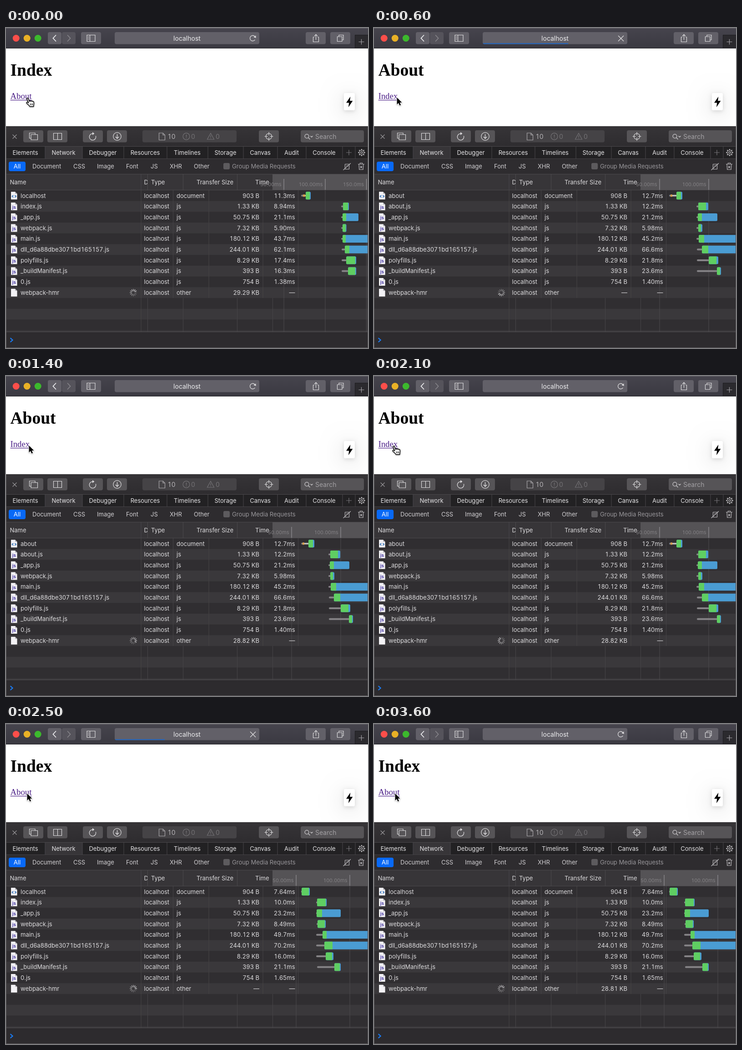
These frames come from a looping animation (796x704 px, 3700 ms). An HTML page with a canvas:

```html
<!DOCTYPE html>
<html lang="en">
<head>
<meta charset="utf-8">
<title>Network panel</title>
<style>
html, body { margin: 0; width: 100%; height: 100%; overflow: hidden; background: #2d2b2d; }
canvas { display: block; width: 796px; height: 704px; }
</style>
</head>
<body>
<canvas id="stage" width="796" height="704"></canvas>
<script>
const ctx = document.getElementById('stage').getContext('2d');
const SANS = 'Inter, Roboto, sans-serif';
const SERIF = '"Liberation Serif", "Noto Serif", serif';
const STEP = 100, STEPS = 37;
const ROW_TOP = 357, ROW_H = 23.7, TABLE_END = 668;
const GREEN = '#5fce62', BLUE = '#4a9cd3', INK = '#dddcde', BUTTON = '#626068';

const LIBS = ['_app.js', 'webpack.js', 'main.js', 'dll_d6a88dbe3071bd165157.js',
  'polyfills.js', '_buildManifest.js', '0.js', 'webpack-hmr'];
const LIB_SIZES = ['50.75 KB', '7.32 KB', '180.12 KB', '244.01 KB', '8.29 KB', '393 B', '754 B'];

// bars: [queue start, green start, blue start, end]
const indexFirst = {
  names: ['localhost', 'index.js'], size: '903 B', hmr: '29.29 KB',
  times: ['11.3ms', '8.94ms', '21.1ms', '5.90ms', '43.7ms', '62.1ms', '17.4ms', '16.3ms', '1.38ms'],
  ticks: [[611, '50.00ms'], [702, '100.00ms'], [792.5, '150.0ms']],
  connect: [653, 658],
  bars: [[649, 659, 668, 670], [737, 741, 752, 754], [737, 740, 748, 775], [737, 740, 747, 748.5],
    [737, 740, 747, 800], [738, 745, 755, 800], [738, 748, 768, 770], [738, 752, 768, 770]]
};
const aboutPage = {
  names: ['about', 'about.js'], size: '908 B', hmr: '28.82 KB',
  times: ['12.7ms', '12.2ms', '21.2ms', '5.98ms', '45.2ms', '66.6ms', '21.8ms', '23.6ms', '1.40ms'],
  ticks: [[628, '50.00ms'], [736, '100.00ms']],
  connect: [652, 656],
  bars: [[649, 665, 675, 678], [709, 713, 730, 735], [709, 712, 721, 755], [709, 713, 719, 722],
    [709, 714, 726, 800], [710, 721, 735, 800], [710, 736, 753, 757], [710, 754, 761, 763]]
};
const indexAgain = {
  names: ['localhost', 'index.js'], size: '904 B', hmr: '28.81 KB',
  times: ['7.64ms', '10.0ms', '23.2ms', '8.49ms', '49.7ms', '70.2ms', '16.0ms', '21.1ms', '1.65ms'],
  ticks: [[638, '50.00ms'], [756, '100.00ms']],
  bars: [[649, 650, 666, 668], [682, 684, 703, 705], [682, 683, 695, 736], [683, 685, 701, 703],
    [682, 696, 705, 800], [682, 700, 718, 800], [682, 703, 717, 720], [684, 722, 734, 736]]
};
const indexClosed = { ...indexFirst, ticks: [[620, '20.00s'], [720, '40.00s']], tiny: true };
const aboutClosed = { ...aboutPage, ticks: [[653, '1000.0ms'], [785.5, '2.00s']], tiny: true, short: true };

function rect(x, y, w, h, fill) {
  ctx.fillStyle = fill;
  ctx.fillRect(x, y, w, h);
}
function box(x, y, w, h, r, fill) {
  ctx.beginPath();
  ctx.roundRect(x, y, w, h, r);
  ctx.fillStyle = fill;
  ctx.fill();
}
function line(d, color = INK, width = 1.2) {
  ctx.strokeStyle = color;
  ctx.lineWidth = width;
  ctx.stroke(new Path2D(d));
}
function shape(d, fill) {
  ctx.fillStyle = fill;
  ctx.fill(new Path2D(d));
}
function ring(x, y, r, color = INK, width = 1.2, from = 0, to = Math.PI * 2) {
  ctx.beginPath();
  ctx.arc(x, y, r, from, to);
  ctx.strokeStyle = color;
  ctx.lineWidth = width;
  ctx.stroke();
}
// Every digit takes the same width, as in a table of figures.
function text(s, x, y, color = INK, align = 'left', font = '13px ' + SANS) {
  ctx.font = font;
  ctx.textAlign = 'left';
  ctx.fillStyle = color;
  const cell = ctx.measureText('0').width;
  const runs = s.match(/\d|\D+/g).map(run => {
    const own = ctx.measureText(run).width;
    return { run, own, width: /\d/.test(run) ? cell : own };
  });
  const total = runs.reduce((sum, r) => sum + r.width, 0);
  let pen = x - (align === 'right' ? total : align === 'center' ? total / 2 : 0);
  for (const { run, own, width } of runs) {
    ctx.fillText(run, pen + (width - own) / 2, y);
    pen += width;
  }
}
function fade(y, h, top, bottom) {
  const g = ctx.createLinearGradient(0, y, 0, y + h);
  g.addColorStop(0, top);
  g.addColorStop(1, bottom);
  return g;
}
function reload(x, y, r, turn = 0) {
  ctx.save();
  ctx.translate(x, y);
  ctx.rotate(turn);
  ring(0, 0, r, INK, 1.3, -0.3, Math.PI * 1.5);
  shape(`M-.5 ${-r - 3.2}l4.5 3.2l-4.5 3.2z`, INK);
  ctx.restore();
}

function drawBrowser(s) {
  rect(0, 0, 796, 45, fade(0, 45, '#46444d', '#3a3941'));
  rect(0, 0, 796, 1, '#68666c');
  rect(0, 44, 796, 1, '#1f1e22');
  ['#fc4e4a', '#e9b126', '#3cb92d'].forEach((c, i) => box(14.7 + i * 24, 15, 15, 15, 7.5, c));

  box(92, 9, 30, 26.5, 4, BUTTON);
  box(123, 9, 30, 26.5, 4, '#55535b');
  line('M110 15.5L103.5 22.5L110 29.5', '#ececee', 1.8);
  line('M135 15.5L141.5 22.5L135 29.5', '#88868b', 1.6);
  box(165, 9, 44, 26.5, 4, BUTTON);
  line('M178 15.5H196V29.5H178ZM184.5 15.5V29.5M180 19H182.5M180 22H182.5M180 25H182.5', INK);

  box(239, 9, 318, 26.5, 4, BUTTON);
  if (s.progress) {
    ctx.save();
    ctx.beginPath();
    ctx.roundRect(239, 9, 318, 26.5, 4);
    ctx.clip();
    rect(239, 33.5, s.progress, 2, '#1a68cc');
    ctx.restore();
    line('M537 17L549 29M549 17L537 29', INK, 1.4);
  } else reload(542.5, 22.5, 6, 0.9);
  text('localhost', 398, 27.5, '#ececee', 'center', '14px ' + SANS);

  const dim = s.list.tiny;
  box(659, 9, 44, 26.5, 4, dim ? '#53515a' : BUTTON);
  line('M678 20H675.5V30.5H687.5V20H685M681.5 26V14.5M678 18L681.5 14.2L685 18', dim ? '#88868b' : INK);
  box(713, 9, 44, 26.5, 4, BUTTON);
  line('M732 19V15.5H742V26H739M728.5 19H739V29.5H728.5Z', INK);
  rect(767, 15, 29, 29, '#2b2a2e');
  rect(767, 15, 29, 1, '#1d1c1f');
  rect(767, 15, 1, 29, '#1d1c1f');
  line('M781.5 24.5V36.5M775.5 30.5H787.5', '#a5a3a8');
}

function drawPage(s) {
  rect(0, 45, 796, 171, '#fff');
  const [title, link] = s.about ? ['About', 'Index'] : ['Index', 'About'];
  text(title, 9.5, 105, '#000', 'left', 'bold 37.5px ' + SERIF);
  const color = s.red ? '#dc1a12' : '#4b1f87';
  text(link, 9.5, 156.3, color, 'left', '18.75px ' + SERIF);
  rect(9.5, 158, ctx.measureText(link).width, 1.2, color);

  ctx.save();
  ctx.beginPath();
  ctx.rect(0, 45, 796, 171);
  ctx.clip();
  ctx.shadowColor = 'rgba(0,0,0,.16)';
  ctx.shadowBlur = 48;
  ctx.shadowOffsetY = 8;
  box(743, 143, 24, 38, 3, '#fff');
  ctx.shadowColor = 'rgba(0,0,0,.14)';
  ctx.shadowBlur = 9;
  ctx.shadowOffsetY = 2;
  box(743, 143, 24, 38, 3, '#fff');
  ctx.restore();
  shape('M757.3 151L748 164.5H754.2L753 174.3L762.4 160.2H756.2Z', '#000');
}

function drawTools(s) {
  rect(0, 216, 796, 45, fade(216, 45, '#363437', '#2e2c2f'));
  line('M14.5 234.5L23.5 243.5M23.5 234.5L14.5 243.5', '#99979a');
  for (const x of [38, 91, 169, 222, 556]) box(x, 225, 44, 26.5, 4, '#565457');
  line('M55 242.5H51.5V231H64V234M55 234.5H69.5V246H55Z');
  line('M104.5 231.5H122.5V245.5H104.5ZM113.5 231.5V245.5', INK);
  reload(190.5, 239.5, 7.2);
  ring(244.5, 238.5, 8.7);
  line('M244.5 233.5V243M240.7 239.3L244.5 243.2L248.3 239.3', INK, 1.4);
  ring(578, 238.5, 6.5);
  line('M578 229V236M578 241V248M568.5 238.5H575.5M580.5 238.5H587.5');

  box(300, 225, 207, 26.5, 4, '#454346');
  line('M336.5 231H345L349.5 235.5V246.5H336.5ZM345 231V235.5H349.5', '#a9a7aa');
  const font = '14px ' + SANS;
  text(s.list.short ? '2' : '10', 355, 243.5, '#b5b3b6', 'left', font);
  ring(396.5, 238.5, 7.4, '#737174');
  line('M396.5 234.5V239.8M396.5 241.3V242.8', '#737174', 1.4);
  text('0', 407, 243.5, '#737174', 'left', font);
  line('M450 231.5L457.5 245H442.5ZM450 236V241M450 242.2V243.6', '#737174');
  text('0', 461, 243.5, '#737174', 'left', font);

  box(648, 225, 139, 26.5, 4, '#565457');
  ring(661.5, 238, 4.4, '#cfcdd0', 1.3);
  line('M664.7 241.3L668.5 245M669.5 237.5L672 240L674.5 237.5', '#cfcdd0', 1.3);
  text('Search', 680, 243.5, '#a3a1a4', 'left', font);
}

function drawTabs() {
  rect(0, 260, 796, 28, '#222123');
  rect(0, 260, 796, 1, '#4b494c');
  rect(86, 261, 82, 27, '#373538');
  rect(0, 287, 796, 1, '#434144');
  const edges = [0, 86, 168, 259, 354, 444, 522, 597, 660, 740];
  ['Elements', 'Network', 'Debugger', 'Resources', 'Timelines', 'Storage', 'Canvas', 'Audit', 'Console']
    .forEach((name, i) => text(name, (edges[i] + edges[i + 1]) / 2 - 0.5, 279, '#e6e5e7', 'center'));
  for (const x of [...edges.slice(1), 768]) rect(x - 0.5, 261, 1, 27, '#4b494c');
  line('M754 268V280M748 274H760', '#77757a');
  ring(782, 274, 5.4, '#bbb9bc');
  ring(782, 274, 2.2, '#bbb9bc');
  for (let i = 0; i < 8; i++) {
    const c = Math.cos(i * Math.PI / 4), n = Math.sin(i * Math.PI / 4);
    line(`M${782 + c * 5.5} ${274 + n * 5.5}L${782 + c * 7.8} ${274 + n * 7.8}`, '#bbb9bc', 2);
  }

  rect(0, 288, 796, 34, '#2e2c2f');
  box(6, 294, 37, 21, 4, '#0869f7');
  text('All', 24.5, 309, '#fff', 'center');
  [['Document', 58], ['CSS', 148], ['Image', 200], ['Font', 264], ['JS', 318], ['XHR', 360], ['Other', 413]]
    .forEach(([name, x]) => text(name, x, 309, '#d2d0d3'));
  box(478, 297, 14, 14, 3, '#5d5b5e');
  text('Group Media Requests', 497, 309, '#98969a');
  line('M745.5 299.5H756.5M745.5 299.5V310.5H754.5V299.5M741.5 312.5L758 297.5M748 303H752', '#bbb9bc');
  line('M774 299.5H788M778.5 299V297H783.5V299M776 300L776.8 311.5H785.2L786 300M778.7 303.5L783.3 308.5M783.3 303.5L778.7 308.5', '#bbb9bc');
}

function drawHeader(list) {
  rect(0, 321, 796, 36, '#373538');
  rect(586, 322, 210, 34, '#555356');
  rect(0, 321, 796, 1, '#4b494c');
  rect(0, 356, 796, 1, '#4b494c');
  for (const x of [296.5, 311, 389, 508]) rect(x, 322, 1, 34, '#4b494c');
  text('Name', 8.5, 344);
  ctx.save();
  ctx.beginPath();
  ctx.rect(297, 322, 14, 34);
  ctx.clip();
  text('Domain', 303.5, 344);
  ctx.restore();
  text('Type', 319, 344);
  text('Transfer Size', 500, 344, INK, 'right');
  text('Time', 578.5, 344, INK, 'right');
  for (const [x, label] of list.ticks) {
    text(label, x - 5.5, 347.5, '#838184', 'right', '11px ' + SANS);
    rect(x - 0.5, 332, 1, 24, '#a09ea1');
  }
}

function drawIcon(y, kind) {
  shape(`M11 ${y - 8.5}H20L24.5 ${y - 4}V${y + 8.5}H11Z`, '#f3f2f5');
  shape(`M20 ${y - 8.5}V${y - 4}H24.5Z`, '#b4b2b8');
  if (kind === 'js') text('js', 17.8, y + 5, '#4334a0', 'center', 'bold 9.5px ' + SANS);
  if (kind === 'doc') line(`M16.3 ${y - 1}L13.3 ${y + 1.5}L16.3 ${y + 4}M19.2 ${y - 1}L22.2 ${y + 1.5}L19.2 ${y + 4}`, '#2468b4', 1.4);
}

function drawSpinner(x, y, phase) {
  ctx.lineCap = 'round';
  for (let i = 0; i < 12; i++) {
    const a = i * Math.PI / 6, c = Math.cos(a), n = Math.sin(a);
    const glow = 0.2 + 0.65 * ((i - phase + 24) % 12) / 11;
    line(`M${x + c * 4} ${y + n * 4}L${x + c * 7.5} ${y + n * 7.5}`, `rgba(225,224,226,${glow})`, 1.5);
  }
  ctx.lineCap = 'butt';
}

function drawBar(list, i, y) {
  const bar = list.bars[i];
  if (list.tiny) {
    const x = list.short && i ? 654.5 : i === 8 ? 652 : 651.3;
    box(x - 2.3, y - 2, 3, 4, 2, '#858386');
    rect(x, y - 8.5, 2.4, 17, BLUE);
    return;
  }
  if (!bar) return;
  const [queue, green, blue, end] = bar;
  box(queue, y - 2, green - queue + 1, 4, 2, '#858386');
  if (i === 0 && list.connect) {
    const [a, b] = list.connect;
    rect(b, y - 1, green - b, 2, '#d5d3cd');
    box(a, y - 2.5, b - a, 5, 1, '#d9a14d');
  }
  box(green, y - 8.5, end - green, 17, 2.5, BLUE);
  box(green, y - 8.5, blue - green, 17, [2.5, 0, 0, 2.5], GREEN);
}

function drawTable(s) {
  const list = s.list, count = list.short ? 2 : 10;
  ctx.save();
  ctx.beginPath();
  ctx.rect(0, ROW_TOP, 796, TABLE_END - ROW_TOP);
  ctx.clip();
  for (let i = 0; i < 14; i++) rect(0, ROW_TOP + i * ROW_H, 796, ROW_H + 1, i % 2 ? '#3a383b' : '#302e31');
  const split = ROW_TOP + count * ROW_H;
  for (const x of [296.5, 367, 445.5, 564.5, 642]) rect(x, ROW_TOP, 1, split - ROW_TOP, '#464447');
  for (const x of [296.5, 311, 389, 508, 586]) rect(x, split, 1, TABLE_END - split, '#464447');
  for (const [x] of list.ticks) rect(x - 0.5, ROW_TOP, 1, TABLE_END - ROW_TOP, '#4d4b4e');

  const names = [...list.names, ...LIBS], sizes = [list.size, '1.33 KB', ...LIB_SIZES];
  for (let i = 0; i < count; i++) {
    const y = ROW_TOP + (i + 0.5) * ROW_H, base = y + 4.7, hmr = i === 9;
    const color = hmr && list.tiny ? '#d2453e' : INK;
    drawIcon(y, hmr ? '' : i ? 'js' : 'doc');
    text(names[i], 32, base, color);
    text('localhost', 303.5, base, color);
    text(hmr ? 'other' : i ? 'js' : 'document', 375, base, color);
    text(hmr ? (s.pending ? '—' : list.hmr) : sizes[i], 557, base, color, 'right');
    text(hmr ? (list.tiny ? '52.50s' : '—') : list.times[i], 635.5, base, color, 'right');
    if (!hmr) drawBar(list, i, y);
    else if (list.tiny) box(649, y - 8.5, 160, 17, 2, BLUE);
    else drawSpinner(280, y, s.spin);
  }
  ctx.restore();
}

function drawConsole() {
  rect(0, 668, 796, 36, '#2d2b2e');
  rect(0, 668, 796, 1, '#535154');
  line('M9.5 682L14.5 686.5L9.5 691', '#1a7cf5', 2.3);
  rect(0, 703, 796, 1, '#656366');
  rect(0, 216, 1, 488, '#5a585b');
  rect(795, 216, 1, 488, '#5a585b');
}

const ARROW = new Path2D('M0 0V15.2L3.5 12L5.9 17.6L8.5 16.5L6.2 11H10.9Z');
const HAND = new Path2D('M-4.6 1.8C-5.2 -.4 -2.4 -1.4 -1.5 .6L1.2 7.2C1.2 5.2 3.8 4.8 4.5 6.8' +
  'C5.1 5.2 7.3 5.4 7.8 7.2C8.6 6.2 10.4 6.8 10.7 8.4C11.1 10.6 11.4 12.8 10.5 14.8L10.2 18.2H1.8' +
  'C.9 15.6 -2.4 13.8 -5 11C-6.4 9.4 -4.4 7.8 -2.6 9L-.9 10.2Z');

function drawCursor(s) {
  ctx.save();
  ctx.translate(s.x, s.hand ? 154.5 : 153);
  ctx.lineJoin = 'round';
  ctx.shadowColor = 'rgba(0,0,0,.3)';
  ctx.shadowBlur = 3;
  ctx.shadowOffsetY = 1;
  ctx.strokeStyle = s.hand ? '#000' : '#fff';
  ctx.lineWidth = s.hand ? 1.4 : 2;
  ctx.fillStyle = s.hand ? '#fff' : '#000';
  if (s.hand) ctx.fill(HAND);
  ctx.stroke(s.hand ? HAND : ARROW);
  ctx.shadowColor = 'transparent';
  if (s.hand) line('M3 11.5V15.5M5.5 11.5V15.5M8 11.5V15.5', '#000', 1);
  else ctx.fill(ARROW);
  ctx.restore();
}

// Both visits follow the same order: press, clear, load, done.
function stateAt(k) {
  const visit = k >= 20 ? k - 20 : k;
  return {
    about: k >= 5 && k < 25,
    red: visit === 3 || visit === 4,
    hand: visit < 4,
    x: k < 20 ? 50.5 : 46.5,
    progress: [20, 110, 188, 318][visit - 4] || 0,
    pending: visit === 5 || visit === 6,
    spin: k % 12,
    list: k < 4 ? indexFirst : k === 4 ? indexClosed : k < 24 ? aboutPage : k === 24 ? aboutClosed : indexAgain
  };
}

function draw(now) {
  const s = stateAt(Math.floor(now / STEP) % STEPS);
  drawBrowser(s);
  drawPage(s);
  drawTools(s);
  drawTabs();
  drawHeader(s.list);
  drawTable(s);
  drawConsole();
  drawCursor(s);
}

const start = performance.now();
function loop() {
  draw(performance.now() - start);
  requestAnimationFrame(loop);
}
loop();
</script>
</body>
</html>
```
